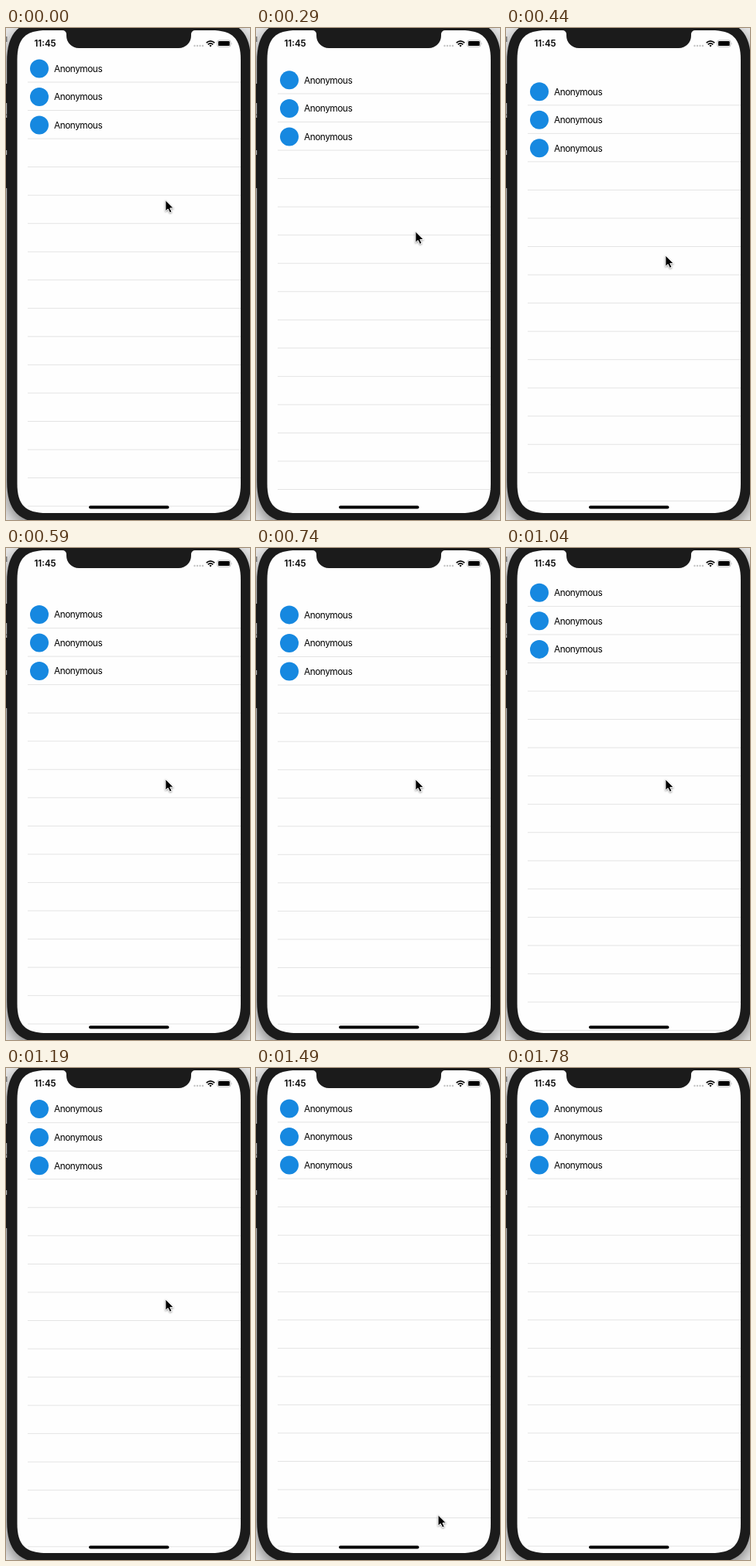
Recreate the animation shown at these times as an HTML page. Size 315 px wide and 636 px high, loop 2080 ms.

```html
<!DOCTYPE html>
<html lang="en">
<head>
<meta charset="utf-8">
<title>Pull to stretch list</title>
<style>
  html, body { margin: 0; width: 100%; height: 100%; overflow: hidden; background: #e9e9e9; }
  svg { display: block; width: 100%; height: 100%; }
  text { font-family: Inter, "Liberation Sans", sans-serif; fill: #000; }
  .name { font-size: 11.8px; letter-spacing: -.45px; }
  .clock { font-size: 11.5px; font-weight: 600; }
  #phone { filter: drop-shadow(0 7px 9px #0007); }
  #cursor path { filter: drop-shadow(0 1px 1px #0006); }
</style>
</head>
<body>
<svg viewBox="0 0 315 636">
  <defs>
    <clipPath id="clip"><path id="mask"/></clipPath>
  </defs>

  <!-- phone body and side buttons -->
  <g id="phone" fill="#1b1b1b">
    <path d="M0 72h2v25h-2zM0 116h2v42h-2zM0 164h2v43h-2z"/>
    <path id="body"/>
  </g>
  <path d="M0 11h1.5v7h-1.5zM0 111h1v2h-1z" fill="#777"/>

  <g clip-path="url(#clip)">
    <rect width="315" height="636" fill="#fefefe"/>
    <g id="list"></g>
  </g>

  <path fill="#1b1b1b" d="M73 2H244V3A5 5 0 0 0 239 8V10A16 16 0 0 1 223 26H94A16 16 0 0 1 78 10V8A5 5 0 0 0 73 3Z"/>

  <!-- status bar -->
  <text class="clock" x="36.5" y="24.2">11:45</text>
  <g id="signal" fill="#c4c4c4"></g>
  <g fill="none" stroke="#000" stroke-width="1.7">
    <path d="M258.7 19.2Q264 14.4 269.3 19.2M260.7 21.4Q264 18.5 267.3 21.4"/>
    <path d="M262.3 22.6Q264 21.2 265.7 22.6L264 24.4Z" fill="#000" stroke="none"/>
  </g>
  <rect x="272.9" y="15.9" width="17" height="8.4" rx="2.3" fill="none" stroke="#aaa" stroke-width=".8"/>
  <rect x="274.1" y="17.1" width="14.6" height="6" rx="1.2"/>
  <path d="M290.9 18.7q1.3 1.4 0 2.8z" fill="#aaa"/>

  <rect x="107" y="617.6" width="103.5" height="3.9" rx="1.95"/>

  <g id="cursor">
    <path d="M1.2 1V15.3L4.4 12.4L6.8 17.3L9.4 16.1L7.1 11.4H11.6Z" stroke="#fff" stroke-linejoin="round"/>
  </g>
</svg>
<script>
const LOOP = 2080, ROW = 36.54, PULL = 34;
const $ = id => document.getElementById(id);

// rectangle with continuous corners: e is their reach, k the distance of the handles
const squircle = (x, y, w, h, e, k) => `M${x + e} ${y}h${w - 2 * e}
  c${e - k} 0 ${e} ${k} ${e} ${e}v${h - 2 * e}
  c0 ${e - k} ${-k} ${e} ${-e} ${e}h${2 * e - w}
  c${k - e} 0 ${-e} ${-k} ${-e} ${-e}v${2 * e - h}
  c0 ${k - e} ${k} ${-e} ${e} ${-e}z`;

$('body').setAttribute('d', squircle(1.2, -10, 315, 650, 54, 15.5));
$('mask').setAttribute('d', squircle(14.5, 3, 288.5, 624, 38, 10.5));

for (let i = 0; i < 4; i++)
  $('signal').innerHTML += `<circle cx="${243.5 + i * 3.5}" cy="23" r="1.2"/>`;

let rows = '';
for (let i = 0; i < 16; i++) {
  const y = i * ROW;
  rows += `<rect x="28" y="${69.5 + y}" width="275" height="1" fill="#e4e4e4"/>`;
  if (i < 3) rows += `<circle cx="43" cy="${52.4 + y}" r="12" fill="#1688e0"/>
    <text class="name" x="62" y="${56.8 + y}">Anonymous</text>`;
}
$('list').innerHTML = rows;

// share of the way covered after n ticks: soft start, long settling
const settle = (n, speed) => n > 0 ? 1 - Math.exp(-speed * n ** 1.85) : 0;

function draw(now) {
  // the screen refreshes in ticks of 149 ms, on a 10 ms grid
  const t = Math.floor(now % LOOP / 10) * 10;
  const n = Math.max(0, Math.floor((t - 140) / 149));

  // drag down, let go after tick 4, leave after tick 7
  const offset = PULL * (settle(n, .58) - settle(n - 4, .51));
  const exit = settle(n - 7, .67);
  const x = 204.7 + 32 * exit;
  const y = 221.5 + 76.5 * settle(n, .757) + 306 * exit;

  $('list').setAttribute('transform', `translate(0 ${offset})`);
  $('cursor').setAttribute('transform', `translate(${x} ${y})`);
  $('cursor').setAttribute('visibility', n < 11 ? 'visible' : 'hidden');
}

function loop() {
  draw(performance.now());
  requestAnimationFrame(loop);
}
loop();
</script>
</body>
</html>
```
